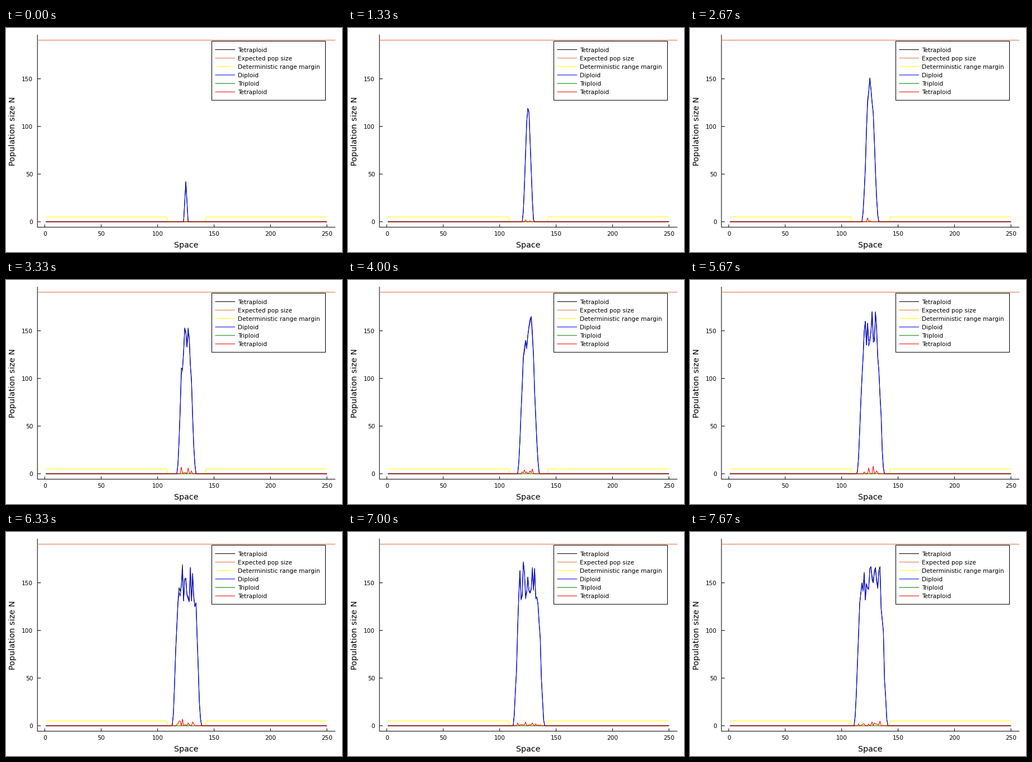
A matplotlib script for the animation above (8 s loop, 600 px wide and 400 px high).

```python
import numpy as np
import matplotlib.pyplot as plt
from matplotlib.animation import FuncAnimation
from matplotlib.patches import Rectangle

WIDTH, HEIGHT, DPI = 600, 400, 100
GENERATIONS, LOOP_MS, STEP_MS = 24, 8000, 40
PX = 72 / DPI  # points per pixel
LINE = 1.05 * PX
CELLS = np.arange(1, 251)
EXPECTED = 190.5
CORAL = "#e26f46"


def sx(space):
    return 69.2 + 2.0156 * np.asarray(space, float)


def sy(count):
    return 346 - 1.702 * np.asarray(count, float)


def colony(gen):
    """Counts per cell of a colony that spreads and fills up with noise."""
    rng = np.random.default_rng(100 + gen)
    spread = gen ** 0.8
    left, right = 123 - 0.98 * spread, 127 + 1.13 * spread
    peak = 172 - 130 * np.exp(-gen / 4)

    depth = np.clip(np.minimum(CELLS - left, right - CELLS), 0, None)
    reach = min(7, (right - left) / 2)
    ramp = np.minimum(depth / reach, 1)
    ramp = ramp ** 2 * (3 - 2 * ramp)
    dips = min(0.24, 0.02 * gen) * rng.random(len(CELLS))
    diploid = np.round(peak * ramp * (1 - dips))

    settled = (depth > reach / 2) & (gen > 1)
    bursts = np.minimum(rng.geometric(0.4, len(CELLS)) - 1, 8)
    return diploid, np.where(settled, bursts, 0)


plt.rcParams["font.family"] = "DejaVu Sans"
fig = plt.figure(figsize=(WIDTH / DPI, HEIGHT / DPI), dpi=DPI,
                 facecolor="white")
ax = fig.add_axes([0, 0, 1, 1])
ax.set(xlim=(0, WIDTH), ylim=(HEIGHT, 0))
ax.axis("off")


def stroke(x, y, color="black", z=2):
    return ax.plot(x, y, color=color, lw=LINE, zorder=z, snap=False,
                   solid_capstyle="butt", solid_joinstyle="round")[0]


def label(x, y, text, size=10.5, **kw):
    ax.text(x, y, text, fontsize=size * PX, va="baseline", zorder=6, **kw)


# axes, with 3 % padding around the data
x0, x1 = sx([1 - 0.03 * 249, 250 + 0.03 * 249])
y0, y1 = sy([-0.03 * EXPECTED, 1.03 * EXPECTED])
stroke([x0, x0, x1], [y1, y0, y0])
for space in range(0, 251, 50):
    stroke([sx(space)] * 2, [y0 - 5, y0])
    label(sx(space), 371, str(space), ha="center")
for count in range(0, 151, 50):
    stroke([x0, x0 + 6], [sy(count)] * 2)
    label(48.3, sy(count) + 4, str(count), ha="right")
label(322, 392, "Space", 14.4, ha="center")
label(16, 184, "Population size N", 14.4, ha="center", rotation=90,
      rotation_mode="anchor")

# series, bottom to top
margin = np.where((CELLS > 108) & (CELLS < 143), 0, 5)
flat = np.zeros(len(CELLS))
total_line = stroke(sx(CELLS), sy(flat), "black", 3)
stroke([x0, x1], [sy(EXPECTED)] * 2, CORAL, 3.1)
stroke(sx(CELLS), sy(margin), "yellow", 3.2)
diploid_line = stroke(sx(CELLS), sy(flat), "blue", 3.3)
stroke(sx(CELLS), sy(flat), "green", 3.4)
tetraploid_line = stroke(sx(CELLS), sy(flat), "red", 3.5)

# legend
ax.add_patch(Rectangle((367.5, 23.5), 203, 105.6, fc="white", ec="black",
                       lw=LINE, zorder=5, snap=False))
ENTRIES = [("Tetraploid", "black"), ("Expected pop size", CORAL),
           ("Deterministic range margin", "yellow"), ("Diploid", "blue"),
           ("Triploid", "green"), ("Tetraploid", "red")]
for i, (name, color) in enumerate(ENTRIES):
    y = 38.6 + 15.1 * i
    stroke([373.5, 409], [y, y], color, 6)
    label(414, y + 4, name)


def draw(step):
    # each generation is held until the step that reaches the next one
    time = (step + 1) * STEP_MS - 1
    diploid, tetraploid = colony(time * GENERATIONS // LOOP_MS)
    total_line.set_ydata(sy(diploid + tetraploid))
    diploid_line.set_ydata(sy(diploid))
    tetraploid_line.set_ydata(sy(tetraploid))
    return total_line, diploid_line, tetraploid_line


anim = FuncAnimation(fig, draw, frames=LOOP_MS // STEP_MS, interval=STEP_MS,
                     init_func=lambda: draw(0), repeat=True, repeat_delay=0)
plt.show()
```
